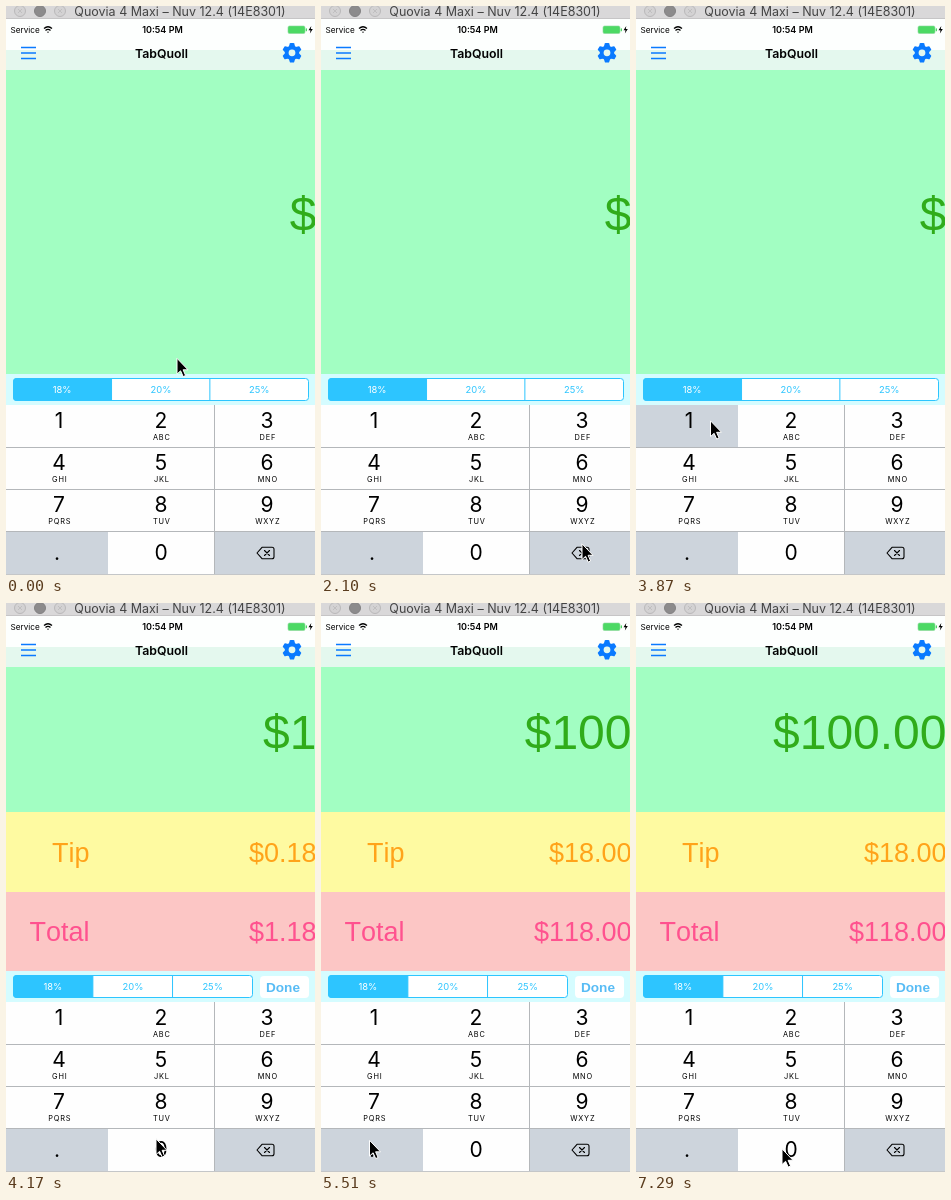
Animation, 309 px wide and 569 px high, one loop 8000 ms. Source, as an HTML page:

```html
<!DOCTYPE html>
<html lang="en">
<head>
<meta charset="utf-8">
<title>Tip calculator</title>
<style>
html, body { margin: 0; width: 100%; height: 100%; overflow: hidden; background: #fff; }
svg { display: block; width: 309px; height: 569px; }
text { font-family: Inter, Roboto, sans-serif; }
.num, .num text { font-family: "Liberation Sans", Arial, sans-serif; font-kerning: none; }
.mid { text-anchor: middle; }
.end { text-anchor: end; }
.digit { font-size: 21px; }
.letters { font-size: 7.4px; letter-spacing: .8px; }
.seg { font-size: 9.4px; }
</style>
</head>
<body>
<svg id="stage" viewBox="0 0 309 569">
  <!-- window title bar -->
  <rect width="309" height="13" fill="#d9d8d9"/>
  <rect y="12" width="309" height="1" fill="#c6c5c6"/>
  <g fill="#d3d2d3" stroke="#bab9ba">
    <circle cx="14" cy="5" r="5.5"/>
    <circle cx="34" cy="5" r="5.5" fill="#8c8b8c" stroke="#828182"/>
    <circle cx="54" cy="5" r="5.5"/>
  </g>
  <path d="M12 3l4 4m0-4l-4 4M52 3l4 4m0-4l-4 4" stroke="#c0bfc0"/>
  <text class="mid" x="174" y="10" font-size="12.5" fill="#444">Quovia 4 Maxi – Nuv 12.4 (14E8301)</text>

  <!-- status bar and navigation bar -->
  <rect y="13" width="309" height="31" fill="#fdfffe"/>
  <rect y="44" width="309" height="20" fill="#e4f8ee"/>
  <text x="4.5" y="27" font-size="8.2">Service</text>
  <g fill="none" stroke="#000" stroke-width="1.3">
    <path d="M38 22.6q4-3.6 8 0M39.5 24.5q2.5-2.3 5 0"/>
    <path d="M42 27l-1.2-1.3h2.4z" fill="#000" stroke="none"/>
  </g>
  <text class="mid" x="156.5" y="27" font-size="9" font-weight="600">10:54 PM</text>
  <rect x="282" y="20" width="17" height="7.5" rx="1.5" fill="#4cd964" stroke="#8bd79a" stroke-width=".6"/>
  <rect x="299.7" y="22.3" width="1.3" height="3" rx=".6" fill="#4cd964"/>
  <path d="M305.3 20l-2.8 4.300h2l-.6 3.200 2.900-4.400h-2z"/>
  <path d="M15 41.5h15M15 47h15M15 52.5h15" stroke="#0a7aff" stroke-width="1.6"/>
  <text class="mid" x="155.5" y="52" font-size="12.3" font-weight="600">TabQuoll</text>
  <g id="gear" transform="translate(286 46.8)" fill="#0a7aff"></g>

  <!-- amounts -->
  <g class="num">
    <rect id="green" y="64" width="309" fill="#a2fec2"/>
    <rect id="yellow" width="309" fill="#fefaa1"/>
    <rect id="pink" width="309" fill="#fcc6c5"/>
    <text id="amount" class="end" x="310.5" font-size="48" fill="#30ac1a"></text>
    <g id="rows" class="end" font-size="27">
      <g fill="#ffa31a">
        <text x="83.5" y="259">Tip</text>
        <text id="tip" x="310.5" y="259"></text>
      </g>
      <g fill="#ff528f">
        <text x="83.5" y="338">Total</text>
        <text id="total" x="310.5" y="338"></text>
      </g>
    </g>
  </g>

  <!-- percentage bar -->
  <rect y="368" width="309" height="31" fill="#d5fcff"/>
  <g id="segments"></g>
  <g id="done">
    <rect x="254" y="373" width="49" height="22" rx="4" fill="#fff"/>
    <text class="num mid" x="277" y="389" font-size="13.6" font-weight="700" fill="#58bcf5">Done</text>
  </g>

  <g id="pad"></g>
  <g fill="none" stroke="#000" stroke-width="1.1" stroke-linejoin="round" stroke-linecap="round">
    <path d="M251 547l5-5.7h10q2 0 2 2v7.400q0 2-2 2h-10z"/>
    <path d="M258.500 544.500l5 5m0-5l-5 5"/>
  </g>
  <path id="cursor" d="M0-.7V15.100L3.600 11.800 6.200 17.600 8.600 16.500 6.100 10.800H11z" fill="#000" stroke="#fff" stroke-width="1"/>
</svg>
<script>
const LOOP = 8000;
const BLUE = "#2dc5ff", GRAY = "#cdd4dc";
const $ = id => document.getElementById(id);

function add(parent, tag, attrs, label) {
  const el = document.createElementNS("http://www.w3.org/2000/svg", tag);
  for (const k in attrs) el.setAttribute(k, attrs[k]);
  if (label) el.textContent = label;
  return parent.appendChild(el);
}
function set(el, attrs) {
  for (const k in attrs) el.setAttribute(k, attrs[k]);
}

// Settings gear: ring plus six broad teeth
add($("gear"), "circle", { r: 5.3, fill: "none", stroke: "#0a7aff", "stroke-width": 3.8 });
for (let i = 0; i < 6; i++)
  add($("gear"), "path", { d: "M-3.2-6L-2.2-9.2Q-2-9.700-1.500-9.700H1.500Q2-9.700 2.200-9.200L3.200-6z", transform: `rotate(${i * 60})` });

// Number pad
const letters = ["", "ABC", "DEF", "GHI", "JKL", "MNO", "PQRS", "TUV", "WXYZ"];
const colX = [0, 102, 209, 309], colMid = [53, 155, 261];
const rowY = [399, 441.5, 483.5, 525.5, 568], base = [422, 464, 506, 554];
const keys = {};
[..."123456789.0<"].forEach((name, i) => {
  const c = i % 3, r = Math.floor(i / 3);
  const idle = name === "." || name === "<" ? GRAY : "#fefefe";
  const box = add($("pad"), "rect", {
    x: colX[c], y: rowY[r], width: colX[c + 1] - colX[c], height: rowY[r + 1] - rowY[r], fill: idle
  });
  keys[name] = { box, idle, down: idle === GRAY ? "#fefefe" : GRAY };
  if (name !== "<")
    add($("pad"), "text", { class: "digit mid", x: name === "." ? 51 : colMid[c], y: base[r] }, name);
  if (letters[i])
    add($("pad"), "text", { class: "letters mid", x: colMid[c] + .8, y: base[r] + 12 }, letters[i]);
});
add($("pad"), "path", {
  d: "M0 441.5H309M0 483.5H309M0 525.5H309M208.5 399V568", stroke: "#b4b7ba", "stroke-width": 1
});
add($("pad"), "rect", { y: 568, width: 309, height: 1, fill: "#c4c6c8" });

// Segmented control
const seg = $("segments");
const frame = add(seg, "rect", { x: 7.5, y: 372.5, height: 22, rx: 3, fill: "#fff", stroke: BLUE });
const chosen = add(seg, "path", { fill: BLUE });
const divider = add(seg, "path", { stroke: BLUE });
const labels = ["18%", "20%", "25%"].map((s, i) =>
  add(seg, "text", { class: "seg mid", y: 387, fill: i ? BLUE : "#fff" }, s));

// Rows: time, changed fields (x, y pointer; key held; s typed; p panel opening)
const steps = [
  [0, { x: 171, y: 353, key: "", s: "", p: 0 }],
  [150, { x: 140, y: 386 }], [300, { x: 103, y: 428 }],
  [450, { x: 82, y: 441 }], [600, { x: 74, y: 414 }],
  [1650, { x: 105, y: 450 }], [1800, { x: 190, y: 505 }],
  [1950, { x: 262, y: 536 }], [2100, { x: 261, y: 538.5 }],
  [2550, { key: "<" }], [2700, { key: "" }],
  [3140, { x: 205, y: 500 }], [3290, { x: 108, y: 438 }], [3430, { x: 74.5, y: 415.5 }],
  [3730, { key: "1" }], [3880, { key: "", s: "1", p: .6 }],
  [4030, { x: 112, y: 480, p: 1 }], [4170, { x: 150, y: 536.5 }], [4320, { x: 149.5, y: 537.5 }],
  [4620, { key: "0" }], [4770, { key: "", s: "10" }],
  [4910, { key: "0" }], [5060, { key: "", s: "100" }],
  [5360, { x: 80, y: 538 }], [5510, { x: 48.5, y: 538 }],
  [5810, { key: "." }], [5960, { key: "", s: "100." }],
  [6110, { x: 62, y: 539 }], [6250, { x: 108, y: 543 }],
  [6400, { x: 138, y: 546 }], [6550, { x: 146, y: 546.5 }],
  [6850, { key: "0" }], [7000, { s: "100.0" }], [7290, { key: "", s: "100.00" }]
];

function stateAt(t) {
  const st = {};
  for (const [at, change] of steps) {
    if (at > t) break;
    Object.assign(st, change);
  }
  return st;
}

function draw(t) {
  const { x, y, key, s, p } = stateAt(t);
  set($("cursor"), { transform: `translate(${x} ${y})` });
  for (const k in keys) set(keys[k].box, { fill: k === key ? keys[k].down : keys[k].idle });

  const top = 368 - 159 * p, split = 368 - 79 * p;
  set($("green"), { height: top - 64 });
  set($("yellow"), { y: top, height: split - top });
  set($("pink"), { y: split, height: 368 - split });
  set($("amount"), { y: 145.5 + (top - 209) / 2 });
  set($("rows"), { opacity: p });
  set($("done"), { opacity: p });

  const bill = parseFloat(s) || 0;
  $("amount").textContent = "$" + s;
  $("tip").textContent = "$" + (bill * .18).toFixed(2);
  $("total").textContent = "$" + (bill * 1.18).toFixed(2);

  const w = 295 - 56 * p, third = w / 3;
  const a = 7.2 + third, b = 7.2 + 2 * third;
  set(frame, { width: w });
  set(chosen, { d: `M11 372H${a}V395H11q-4 0-4-4V376q0-4 4-4z` });
  set(divider, { d: `M${a} 373V394M${b} 373V394` });
  labels.forEach((el, i) => set(el, { x: 7.5 + third * (i + .5) - (i ? 0 : .5) }));
}

const start = performance.now();
function tick(now) {
  draw(Math.max(0, now - start) % LOOP);
  requestAnimationFrame(tick);
}
draw(0);
requestAnimationFrame(tick);
</script>
</body>
</html>
```
